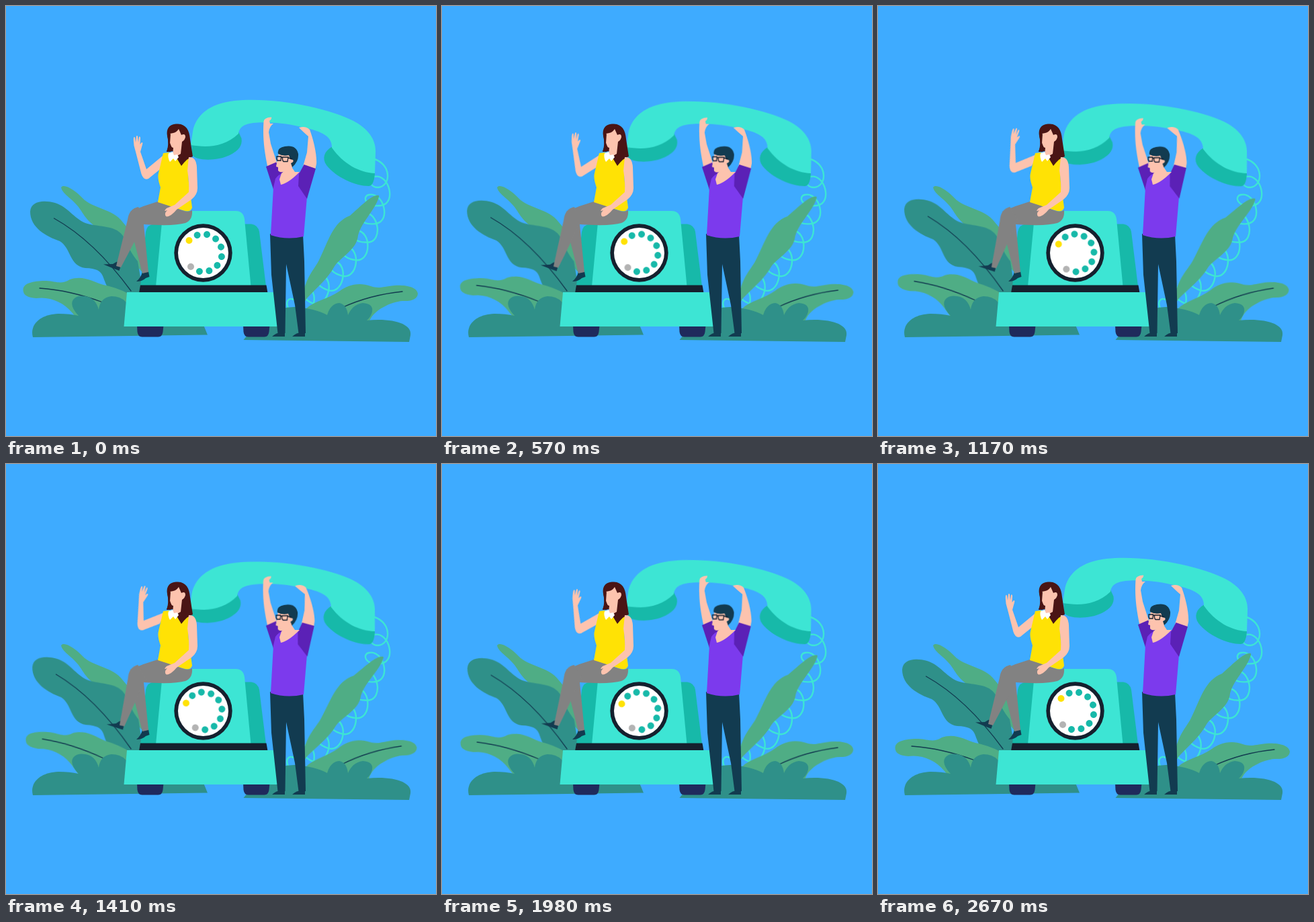
Animation, 640 px wide and 640 px high, one loop 2.7 s. Source, as an HTML page without scripts:

```html
<!DOCTYPE html>
<html lang="en">
<head>
<meta charset="utf-8">
<title>Two people with a giant telephone</title>
<style>
  html, body { margin: 0; width: 100%; height: 100%; overflow: hidden; background: #3eabff; }
  svg { display: block; width: 100%; height: 100%; }
  .teal { fill: #3de5d4; }
  .deep { fill: #17b9a9; }
  .bush { fill: #2f9089; }
  .leaf { fill: #4fad85; }
  .skin { fill: #fdc3ae; }
  .navy { fill: #123b50; }
  .black { fill: #15202e; }
  .foot { fill: #1f2a5c; }
  .gray { fill: #828282; }
  .yellow { fill: #ffe205; }
  .purple { fill: #7c3aed; }
  .plum { fill: #5b21b6; }
  .brown { fill: #4a1515; }
  .white { fill: #fff; }
  .vein { fill: none; stroke: #123b50; stroke-width: 1.3; stroke-linecap: round; }
  .cord { fill: none; stroke: #3de5d4; stroke-width: 2.4; stroke-linecap: round; }

  /* --r: angle at the far end, --y: vertical drift; transform-origin is the joint */
  .sway { animation: sway 1350ms cubic-bezier(.37, 0, .63, 1) infinite alternate; }
  @keyframes sway {
    from { transform: none; }
    to { transform: translateY(var(--y, 0px)) rotate(var(--r)); }
  }
  .dial { transform-origin: 293.5px 367.5px; animation: dial 2700ms cubic-bezier(.37, 0, .63, 1) infinite; }
  @keyframes dial {
    0%, 100% { transform: rotate(0deg); }
    70.4% { transform: rotate(-20deg); }
  }
</style>
</head>
<body>
<svg viewBox="0 0 640 640">
  <defs>
    <path id="coil" d="M0 0c22-5 34 40 10 43s-28-14-18-16"/>
  </defs>

  <!-- left plants -->
  <path class="leaf" d="M82 270C86 263 104 275 114 286C128 301 160 302 174 322L206 360V400L150 335C130 330 120 318 112 305C102 288 84 281 82 270Z"/>
  <g class="sway" style="--r:1.5deg;transform-origin:186px 428px">
    <path class="bush" d="M36 306C37 291 54 288 73 293C92 299 100 315 118 323C140 330 165 325 176 345C182 358 186 368 196 380L205 432L155 424C140 405 151 391 118 390C94 387 97 360 80 350C60 343 36 330 36 306Z"/>
    <path class="vein" d="M71.500 316Q131 349 186 424"/>
  </g>
  <g class="sway" style="--r:5deg;transform-origin:175px 462px">
    <path class="leaf" d="M25.500 422C26 411 45 409 60 409C76 410 82 415 95 407C115 400 131 411 145 415Q165 419 182 428V470H110L98 456C86 441 65 432 45 435Q25 434 25.500 422Z"/>
    <path class="vein" d="M50 420Q95 423 144 441"/>
  </g>
  <path class="bush" d="M40 493C35 475 50 459 78 458Q95 458 108 461Q94 446 100 437Q106 430 118 432Q133 434 138 452Q140 434 157 432Q170 432 178 440L200 470H292L300 489.500Z"/>

  <!-- cord -->
  <g class="cord">
    <path d="M549 228C574 237 573 268 554 270C541 270 538 256 548 254"/>
    <use href="#coil" transform="translate(548 254)"/>
    <use href="#coil" transform="translate(540 281)"/>
    <use href="#coil" transform="translate(532 308) rotate(5)"/>
    <use href="#coil" transform="translate(521.700 334) rotate(15)"/>
    <use href="#coil" transform="translate(507 358) rotate(22)"/>
    <use href="#coil" transform="translate(489.500 380) rotate(27)"/>
    <use href="#coil" transform="translate(470 400.500) rotate(32)"/>
    <use href="#coil" transform="translate(449 419) rotate(35)"/>
    <use href="#coil" transform="translate(427 436.500) rotate(38)"/>
  </g>

  <!-- right plants -->
  <path class="leaf sway" style="--r:2.5deg;transform-origin:445px 440px" d="M555 282C546 279 530 296 512 312C486 322 480 350 466 378C458 394 446 402 441 435L440 448L447 436C466 416 480 404 488 389C496 375 520 364 523.500 345C526 324 550 304 555 284Z"/>
  <g class="sway" style="--r:-2.200deg;transform-origin:455px 465px">
    <path class="leaf" d="M613 428C611 417 592 415 578 416C560 418 555 421 543 417C525 410 507 416 497 424C480 436 460 438 446 451V490L540 472C545 452 575 440 590 439Q612 440 613 428Z"/>
    <path class="vein" d="M590 425Q541 430 500 449"/>
  </g>
  <path class="bush" d="M353.500 497L360 489Q390 447 430 448Q460 450 478 460Q483 443 496 442Q507 444 509 460Q516 444 531 442Q547 443 545 455Q543 463 537 468C575 464 605 473 602 490L600 500Z"/>

  <!-- handset -->
  <g class="sway" style="--r:-1.800deg;transform-origin:549px 250px">
    <path class="deep" d="M276 204L277 221C280 230 312 232 333 222C347 215 352 207 350.500 197L345 185Z"/>
    <path class="deep" d="M486 209C473 216 470 227 477 237C491 255 520 268 540 268C546 268 549 258 549 246Z"/>
    <path class="teal" d="M275 207L278 187C282 163 303 145 340 141C400 135 480 152 517 171C540 183 551 200 550 218L549 249C526 248 502 235 485 211C486 189 458 184 435 179C415 174 385 172 368 174C352 176 347 182 346 190C325 210 300 211 275 207Z"/>
  </g>

  <!-- telephone -->
  <path class="foot" d="M195 475h39.500l-1 10q-1 7.500-7 7.500h-24q-6 0-7-7.500zM353 475h39.500l-1 10q-1 7.500-7 7.500h-24q-6 0-7-7.500z"/>
  <path class="deep" d="M200 417L208 336Q210 325 221 324.500H365Q375 326 377 336L387 417Z"/>
  <path class="teal" d="M223 417L232.500 317Q234 305 246 305H342Q353 305 355 317L364.500 417Z"/>
  <path class="black" d="M200 415.500H387.500L389.500 427H198Z"/>
  <path class="teal" d="M180 426H401L405 477H175.500Z"/>
  <circle class="black" cx="293.500" cy="367.500" r="43.200"/>
  <circle class="white" cx="293.500" cy="367.500" r="37.500"/>
  <g class="dial">
    <circle r="28" transform="translate(293.500 367.500) rotate(251.500)" fill="none" stroke="#17b9a9" stroke-width="10" stroke-linecap="round" pathLength="12" stroke-dasharray="0 1 0 1 0 1 0 1 0 1 0 1 0 1 0 5"/>
    <circle class="yellow" cx="272.500" cy="349" r="5"/>
    <circle fill="#b3b3b3" cx="275" cy="388" r="5"/>
  </g>

  <!-- seated woman -->
  <path class="navy" d="M194 410Q201 404 203 396L212 395L213.500 403L208 405Q203 410 194 410Z"/>
  <path class="gray" d="M226 291L262 304Q271 307 277 304Q278 319 267 323Q250 328 205 325L212 396L203 398L187 335L185 306Q205 297 226 291Z"/>
  <g class="sway" style="--r:-3.700deg;transform-origin:195px 310px">
    <path class="navy" d="M145 384.500L159 384L165 380.500L170.500 388L168.500 394Q158 390 145 384.500Z"/>
    <path class="gray" d="M181 318Q183 302 197 299L210 323L204 325Q192 350 171 389L164 387Z"/>
  </g>
  <path class="skin sway" style="--r:18deg;transform-origin:238px 225px" d="M238 219L233 240L212 257Q205 260 201.500 250L193 217Q189 206 190 196Q191 194 192 196L193 203L194 194Q195 192 196 194L197 203L198 195Q199 193 200 196L199.500 206L202 203Q204 203 203 206L200 217L209 243Z"/>
  <path class="yellow" d="M234 219L242 218L256 223L275 227Q270 245 272 263L277 300Q275 308 263 304L226 292L230 270Q225 256 227 249Z"/>
  <path class="brown" d="M240 193C238 180 246 175 256 175.500C268 176 273 185 274 198L278 224Q270 226 261 238L255 228L251 216L239 217Q244 205 240 193Z"/>
  <path class="skin" d="M244 190L249 189Q254 188 257 183L261 192Q267 189 267 195Q266 200 262 202L260 220L253 224L248 222L249 211Q244 210 244 203Z"/>
  <path class="brown" d="M240 193L245 190L244 204L247 211L245 217H239Q243 206 240 193Z"/>
  <path class="white" d="M242 219L248 217L250 222L255 221L257 225L252 231L249 227L244 232Q240 225 242 219Z"/>
  <path class="skin" d="M272 225Q283 224 284 240L285 271Q285 281 276 288L254 303Q246 313 239 313.500Q234 310 240 304Q233 307 239 301L251 296L272 277Q273 262 270 245Z"/>

  <!-- man lifting the handset -->
  <path class="navy" d="M396 492Q402 486 410 486H415V492ZM426 492Q432 486 440 486H445V492Z"/>
  <path class="navy" d="M393 339Q418 347 442 340L444 380L446 487H435.500L430 445L417 384L415.500 487H404.500L395 400Z"/>
  <g class="sway" style="--r:-.3deg;--y:1.500px;transform-origin:399px 265px">
    <path class="skin" d="M383.500 172Q384 166 395 165.500Q396 168 392 171L393 175L398 175Q392 179 391 188L394 205L404 236L390 242C384 215 382 195 383.500 172Z"/>
    <path class="plum" d="M387 239L402 232.500L414 250L399 276Z"/>
  </g>
  <path class="purple" d="M401 257Q406 250 412 249L437 247Q445 256 448 284L443 343Q418 349 394 341L398 270Z"/>
  <g class="sway" style="--r:-3.500deg;transform-origin:442px 278px">
    <path class="skin" d="M436 181Q446 178 452 184C458 200 463 222 462 235L460 244L442 239L448 218L450 194Q444 189 436 181Z"/>
    <path class="plum" d="M443.500 236L461 242L448 287L435 268L436 250Z"/>
  </g>
  <path class="skin" d="M410 249L424 238L430 247L437 247Q420 264 409 266L407 258Z"/>
  <g class="sway" style="--r:-1.500deg;--y:.8px;transform-origin:418px 256px">
    <path class="skin" d="M406 219L402 239L405 240V245Q408 249 415 246L425 242L430 229L424 219Z"/>
    <path class="navy" d="M405 220Q403 211 415 209Q432 206 435 220Q436 231 426 240L424 234Q429 232 427 229L423 228L421 222Q412 224 405 220Z"/>
    <path d="M403 224h6.500l-.5 6h-5q-1.500-2-1-6zM411.500 225h8.500l-1 6.500h-6q-2-2-1.500-6.500zM409.500 225.500h2M420 226l6 1.500" fill="none" stroke="#15202e" stroke-width="1.300"/>
  </g>
</svg>
</body>
</html>
```
